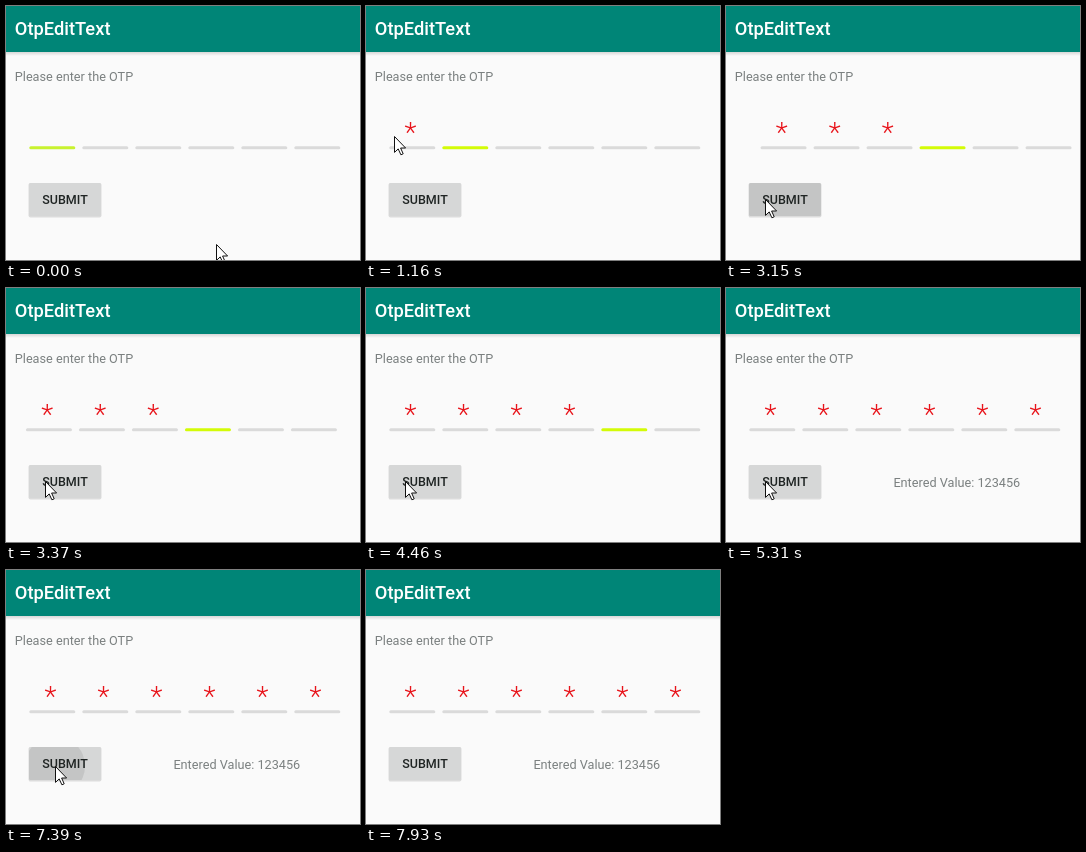
These frames come from a looping animation (354x254 px, 8470 ms). An HTML page:

```html
<!DOCTYPE html>
<html lang="en">
<head>
<meta charset="utf-8">
<title>OtpEditText</title>
<style>
  html, body { margin: 0; width: 100%; height: 100%; overflow: hidden; background: #fafafa; }
  svg { display: block; width: 100vw; height: 100vh; }
  text { font-family: Roboto, sans-serif; font-size: 12.7px; fill: #7b8080; }
  .title { font-size: 18.3px; font-weight: 500; fill: #fff; }
  .label { font-size: 12.5px; font-weight: 500; fill: #1f2423; text-anchor: middle; }
  .star { font-size: 28px; font-weight: 300; fill: #e8131a; text-anchor: middle; }
  .line { stroke-width: 3; stroke-linecap: round; }
</style>
</head>
<body>
<svg viewBox="0 0 354 254">
  <defs>
    <linearGradient id="shade" x2="0" y2="1">
      <stop stop-color="#000" stop-opacity=".14"/>
      <stop offset="1" stop-color="#000" stop-opacity="0"/>
    </linearGradient>
    <clipPath id="face"><rect x="23" y="177" width="72" height="33" rx="1.5"/></clipPath>
  </defs>
  <rect width="354" height="254" fill="#fafafa"/>
  <rect y="46" width="354" height="4" fill="url(#shade)"/>
  <rect width="354" height="46" fill="#008577"/>
  <text class="title" x="8.8" y="28.5">OtpEditText</text>
  <text x="8.8" y="74.5">Please enter the OTP</text>

  <g id="otp"></g>

  <rect x="22.5" y="177" width="73" height="34.5" rx="2" fill="#000" opacity=".12"/>
  <rect x="23" y="177" width="72" height="33" rx="1.5" fill="#d6d7d7"/>
  <g clip-path="url(#face)"><circle id="ripple"/></g>
  <text class="label" x="59" y="198.3">SUBMIT</text>
  <text id="result" x="167.4" y="199">Entered Value: 123456</text>

  <path id="cursor" d="M.5.5V16.4L4.2 12.9 6.9 18.8 9.2 17.8 6.6 12H11.6Z"
        fill="#fff" stroke="#111" stroke-width="1" stroke-linejoin="round"/>
</svg>
<script>
const LOOP = 8470, TICK = 75;
const byId = id => document.getElementById(id);
const otp = byId('otp'), ripple = byId('ripple'), result = byId('result'), cursor = byId('cursor');

const typedAt = [1160, 1460, 1770, 4460, 4920, 5310];
const presses = [{ down: 2920, up: 3180 }, { down: 7390, up: 7720 }];
const shakeAt = 3080, shakeTime = 290;

// Each pointer leg continues from the end of the one before; bend bows its path
const home = [210, 238];
const legs = [
  { at: 70, steps: 2, to: [40, 134] },
  { at: 300, steps: 4, to: [28, 130], bend: [-21, -14] },
  { at: 2470, steps: 3, to: [40, 172] },
  { at: 2695, steps: 4, to: [39, 193], bend: [23, 4] },
  { at: 6240, steps: 3, to: [231, 260] },
  { at: 6710, steps: 1, to: [128, 203] },
  { at: 6785, steps: 7, to: [49, 196], bend: [0, 20] },
  { at: 7780, steps: 3, to: [225, 260] }
];

const clamp = v => Math.min(1, Math.max(0, v));
const ticks = age => Math.floor((age + 5) / TICK);
const show = (el, on) => el.setAttribute('visibility', on ? 'visible' : 'hidden');

function set(el, attrs) {
  for (const key in attrs) el.setAttribute(key, attrs[key]);
  return el;
}

const add = (name, attrs) =>
  otp.appendChild(set(document.createElementNS(otp.namespaceURI, name), attrs));

const cells = typedAt.map((_, i) => {
  const x = 23 + 53 * i;
  const line = add('path', { class: 'line', d: `M${x + 1.8} 141.7h43` });
  const star = add('text', { class: 'star', x: x + 21.5, y: 135.5 });
  star.textContent = '*';
  return { line, star };
});

function pointer(t) {
  const i = Math.max(0, legs.findLastIndex(leg => leg.at <= t));
  const { at, steps, to, bend = [0, 0] } = legs[i];
  const from = i ? legs[i - 1].to : home;
  const k = clamp((ticks(t - at) + 1) / steps);
  return from.map((v, n) => Math.round(v + (to[n] - v) * k + bend[n] * Math.sin(Math.PI * k)));
}

// One damped swing to the right and back
function shake(t) {
  const p = clamp(ticks(t - shakeAt) * TICK / shakeTime);
  return 15.2 * (1 - p) * Math.sin(2 * Math.PI * p);
}

function drawRipple(t) {
  const press = presses.findLast(p => p.down <= t);
  if (!press) return set(ripple, { r: 0 });
  const [cx, cy] = pointer(press.down);
  const r = 30 + ticks(t - press.down) * 22;
  set(ripple, { cx, cy, r, opacity: 0.085 * clamp(1 - (t - press.up) / 190) });
}

function draw(t) {
  const typed = typedAt.filter(at => at <= t).length;
  const active = typed ? '#d3fb07' : '#c8f22f';
  cells.forEach(({ line, star }, i) => {
    set(line, { stroke: i === typed ? active : '#dadada' });
    show(star, i < typed);
  });
  show(result, typed === cells.length);
  set(otp, { transform: `translate(${shake(t)})` });
  set(cursor, { transform: `translate(${pointer(t)})` });
  drawRipple(t);
}

const begin = performance.now();
function frame() {
  draw((performance.now() - begin) % LOOP);
  requestAnimationFrame(frame);
}
frame();
</script>
</body>
</html>
```
